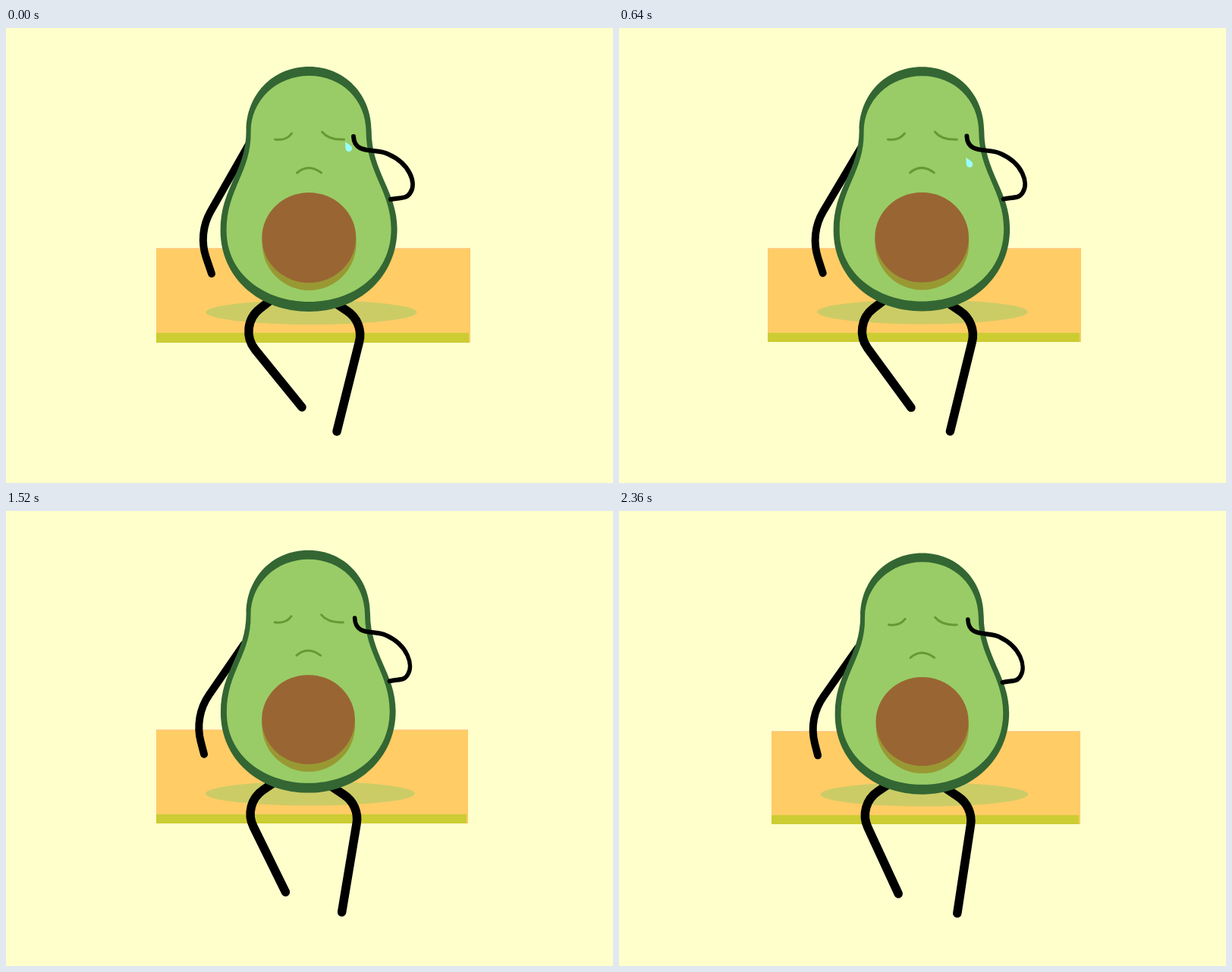
An HTML page with a canvas for the animation above (2.4 s loop, 800 by 600 pixels).

```html
<!DOCTYPE html>
<html lang="en">
<head>
<meta charset="utf-8">
<title>Sad avocado</title>
<style>
  html, body { margin: 0; width: 100%; height: 100%; overflow: hidden; background: #ffffcc; }
  canvas { display: block; }
</style>
</head>
<body>
<canvas id="stage" width="800" height="600"></canvas>
<script>
const ctx = document.getElementById('stage').getContext('2d');
const STEP = 40, STEPS = 60, REST = 28, TEAR_END = 34;

const SKIN = new Path2D('M400 51C350 51 317 90 317 135C317 190 283 210 283 267C283 330 335 374 400 374C465 374 516 328 516 265C516 215 482 190 482 135C482 88 447 51 400 51Z');
const FLESH = new Path2D('M400 63C357 63 323 95 323 137C324 190 291 212 291 267C291 325 342 361 400 361C458 361 508 325 508 265C508 215 475 190 475 137C475 95 443 63 400 63Z');
const FACE = new Path2D('M355 147Q370 149 377 139M417 137Q426 148 446 147M384 191Q399 178 416 191');
const TEAR = new Path2D('M0 0L7 5A4.3 4.3 0 1 1 0.5 9Z');
const WIPING_ARM = new Path2D('M0 0C1 25 30 15 45 23C75 36 83 62 75 74C70 83 62 80 49 83');

const clamp = v => Math.min(1, Math.max(0, v));
const mix = (a, b, t) => a + (b - a) * t;
const bump = (step, start, length) => Math.sin(Math.PI * clamp((step - start) / length));

// Full swings first, then a pause and one weaker swing
function swingAt(step) {
  if (step < REST) return (1 + Math.cos(2 * Math.PI * step / 18.7)) / 2;
  return 0.66 * bump(step, 36, 24);
}

function fill(path, color) {
  ctx.fillStyle = color;
  ctx.fill(path);
}

function ellipse(x, y, rx, ry, color) {
  const path = new Path2D();
  path.ellipse(x, y, rx, ry, 0, 0, Math.PI * 2);
  fill(path, color);
}

function rect(x1, y1, x2, y2, color) {
  const [left, top, right, bottom] = [x1, y1, x2, y2].map(Math.round);
  ctx.fillStyle = color;
  ctx.fillRect(left, top, right - left, bottom - top);
}

// Two straight parts with a round bend; each joint goes from rest to full swing
function limb(rest, full, swing, radius, width) {
  const [x, y, bendX, bendY, endX, endY] = rest.map((v, i) => mix(v, full[i], swing));
  ctx.beginPath();
  ctx.moveTo(x, y);
  ctx.arcTo(bendX, bendY, endX, endY, radius);
  ctx.lineTo(endX, endY);
  ctx.strokeStyle = '#000';
  ctx.lineWidth = width;
  ctx.stroke();
}

function drawBench(step, swing, drift) {
  const left = 198 - 2.4 * bump(step, 9, 20) + 3 * drift;
  const width = 410 + 4 * swing - 3 * drift;
  const right = left + width;
  const top = 288 + 2 * swing + 2 * drift;
  rect(left, top, right, top + 0.302 * width, '#ffcc66');
  rect(left, top, right, top + 1, '#ffcc99');
  rect(left, top + 0.271 * width, right - 2, top + 0.302 * width, '#cccc33');
  ellipse(left + 0.494 * width, top + 0.205 * width, 0.336 * width, 0.039 * width, '#cccc66');
}

function drawLimbs(swing) {
  limb([312, 181, 247, 271, 259, 320], [322, 150, 253, 271, 271, 324], swing, 75, 10);
  limb([354, 358, 313, 385, 364, 503], [350, 358, 304, 394, 390, 500], swing, 38, 11.5);
  const eased = Math.sin(swing * Math.PI / 2);
  limb([428, 364, 464, 388, 445, 528], [436, 364, 472, 388, 436, 532], eased, 38, 11.5);
}

function drawBody(swing, drift) {
  const size = 0.988 + 0.012 * swing - 0.004 * drift;
  ctx.save();
  ctx.translate(398.1 + swing + 1.2 * drift, 211.5 + swing + 3 * drift);
  ctx.scale(size, size);
  ctx.translate(-399.5, -212.5);
  fill(SKIN, '#336633');
  fill(FLESH, '#99cc66');
  ellipse(400, 284, 62, 62, '#999933');
  ellipse(399.7, 276.5, 62, 59.5, '#996633');
  ctx.strokeStyle = '#669933';
  ctx.lineWidth = 3;
  ctx.stroke(FACE);
  ctx.restore();
}

function drawTear(step) {
  if (step >= TEAR_END) return;
  ctx.save();
  ctx.translate(447 + 0.64 * step, 150 + 1.2 * step + 0.0004 * step ** 3);
  fill(TEAR, '#99ffff');
  ctx.restore();
}

function drawWipingArm(swing) {
  ctx.save();
  ctx.translate(460 - 2 * swing, 141 + 2 * swing);
  ctx.scale(0.92 + 0.08 * swing, 1);
  ctx.strokeStyle = '#000';
  ctx.lineWidth = 6;
  ctx.stroke(WIPING_ARM);
  ctx.restore();
}

function draw(step) {
  const swing = swingAt(step);
  const drift = clamp((step - 43) / 16) ** 2;
  rect(0, 0, 800, 600, '#ffffcc');
  ctx.lineCap = ctx.lineJoin = 'round';
  drawBench(step, swing, drift);
  ctx.save();
  ctx.translate(2 * drift, 2 * drift);
  drawLimbs(swing);
  ctx.restore();
  drawBody(swing, drift);
  drawTear(step);
  ctx.save();
  ctx.translate(0, 2 * drift);
  drawWipingArm(swing);
  ctx.restore();
}

function tick() {
  draw(Math.floor(performance.now() / STEP) % STEPS);
  requestAnimationFrame(tick);
}
tick();
</script>
</body>
</html>
```
